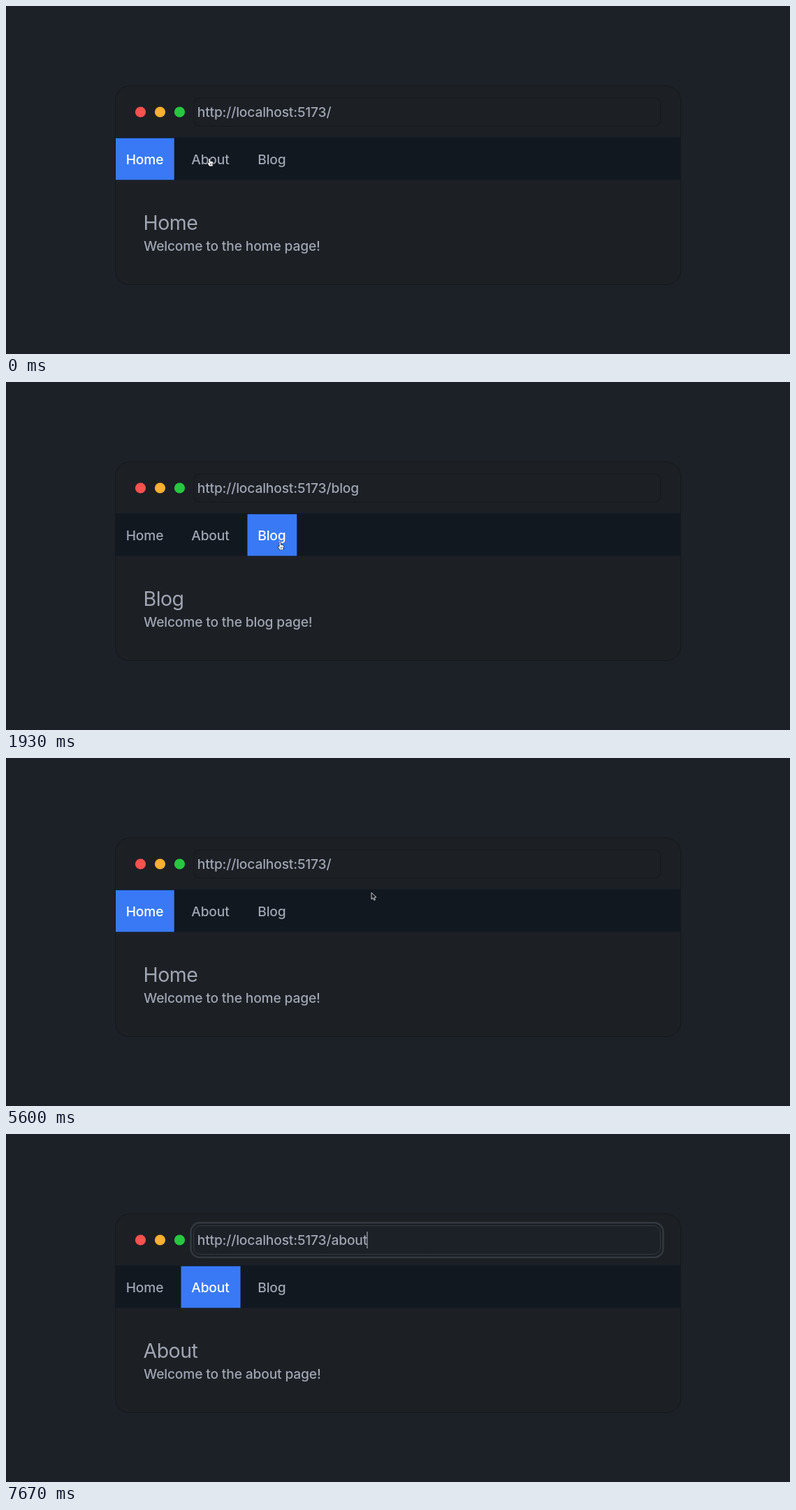
These frames come from a looping animation (1122x499 px, 8000 ms). An HTML page with a canvas:

```html
<!DOCTYPE html>
<html lang="en">
<head>
<meta charset="utf-8">
<title>Router demo</title>
<style>
  html, body { margin: 0; width: 100%; height: 100%; overflow: hidden; background: #1c2027; }
  canvas { display: block; }
</style>
</head>
<body>
<canvas id="stage"></canvas>
<script>
const W = 1122, H = 499, LOOP = 8000, FPS = 15;
const canvas = document.getElementById('stage');
const ctx = canvas.getContext('2d');
const ratio = window.devicePixelRatio || 1;
canvas.width = W * ratio;
canvas.height = H * ratio;
canvas.style.width = W + 'px';
canvas.style.height = H + 'px';

const COLOR = {
  page: '#1c2027', panel: '#1c2025', nav: '#111820', edge: '#15181c',
  ring: '#343840', text: '#a0a5b2', active: '#3979f6', white: '#ffffff', ink: '#14171c'
};
const FONT = {
  body: { weight: 500, size: 19.2, tracking: -0.15 },
  heading: { weight: 400, size: 28.5, tracking: -0.55 }
};
const BASE_URL = 'http://localhost:5173/';
const URL_X = 273.8;
const TABS = [
  { name: 'Home', x: 157, w: 83.7 },
  { name: 'About', x: 250.5, w: 85 },
  { name: 'Blog', x: 345.5, w: 70.7 }
];

// Time from which each state holds
const PAGES = [[0, 'Home'], [130, 'About'], [1530, 'Blog'], [3730, 'Home'], [7670, 'About']];
const TYPED = [[0, ''], [6800, 'a'], [7130, 'ab'], [7400, 'abo'], [7470, 'abou'], [7670, 'about']];
const FOCUS = 5930, CARET_OFF = 6470, TYPING = 6800;

// Pointer strokes: start, end, quadratic curve points
const MOVES = [
  { from: 133, to: 1000, pts: [[291, 219], [340, 252], [393, 228]] },
  { from: 1880, to: 1930, pts: [[393, 228], [393, 229], [392, 230]] },
  { from: 2000, to: 2867, pts: [[392, 230], [305, 288], [207, 221]] },
  { from: 5200, to: 5600, pts: [[207, 221], [370, 475], [523, 193]] },
  { from: 5600, to: 5933, pts: [[523, 193], [514, 166], [500, 153]] }
];

const at = (list, t) => list.filter(([start]) => t >= start).pop()[1];
const smooth = k => k * k * (3 - 2 * k);

function pointerAt(t) {
  const move = MOVES.filter(m => t >= m.from).pop() || MOVES[0];
  const k = smooth(Math.max(0, Math.min(1, (t - move.from) / (move.to - move.from))));
  const [a, b, c] = move.pts;
  return [0, 1].map(i => (1 - k) ** 2 * a[i] + 2 * k * (1 - k) * b[i] + k * k * c[i]);
}

function roundBox(x, y, w, h, r, fill, stroke, line = 1) {
  ctx.beginPath();
  ctx.roundRect(x, y, w, h, r);
  if (fill) { ctx.fillStyle = fill; ctx.fill(); }
  if (stroke) { ctx.strokeStyle = stroke; ctx.lineWidth = line; ctx.stroke(); }
}

function label(str, x, y, color = COLOR.text, font = FONT.body) {
  ctx.font = `${font.weight} ${font.size}px Inter, "Open Sans", sans-serif`;
  ctx.letterSpacing = `${font.tracking}px`;
  ctx.fillStyle = color;
  ctx.fillText(str, x, y);
}

function drawWindow() {
  ctx.fillStyle = COLOR.page;
  ctx.fillRect(0, 0, W, H);
  roundBox(156.5, 115, 809, 284.5, 20, COLOR.panel, COLOR.edge);
  [['#f9524f', 192.5], ['#fbb030', 220.5], ['#27c840', 248.5]].forEach(([color, x]) => {
    ctx.beginPath();
    ctx.arc(x, 152, 7.6, 0, Math.PI * 2);
    ctx.fillStyle = color;
    ctx.fill();
  });
}

function drawAddress(t, page) {
  const focused = t >= FOCUS;
  roundBox(268.5, 131.5, 668, 41, 10, focused ? COLOR.page : null, focused ? COLOR.ring : COLOR.edge);
  if (focused) roundBox(264.5, 127.3, 676, 49.6, 13, null, COLOR.ring, 2.4);

  const path = focused ? at(TYPED, t) : page === 'Home' ? '' : page.toLowerCase();
  const url = BASE_URL + path;
  label(url, URL_X, 159.3);
  if (focused && (t < CARET_OFF || t >= TYPING)) {
    ctx.fillStyle = COLOR.text;
    ctx.fillRect(URL_X + ctx.measureText(url).width - 0.8, 140, 1.2, 24);
  }
}

function drawNav(page) {
  ctx.fillStyle = COLOR.nav;
  ctx.fillRect(157, 188.3, 808.5, 61);
  TABS.forEach(({ name, x, w }) => {
    const active = name === page;
    if (active) {
      ctx.fillStyle = COLOR.active;
      ctx.fillRect(x, 189.5, w, 59.8);
    }
    label(name, x + 14.7, 226.7, active ? COLOR.white : COLOR.text);
  });
}

function shape(x, y, points) {
  ctx.beginPath();
  points.forEach(([px, py]) => ctx.lineTo(x + px, y + py));
  ctx.closePath();
}

function drawArrow(x, y) {
  shape(x, y, [[0, 0], [0, 9.6], [2.2, 7.6], [3.8, 11], [5.4, 10.3], [3.9, 7], [7, 6.8]]);
  ctx.fillStyle = COLOR.ink;
  ctx.fill();
  ctx.strokeStyle = '#dfe1e5';
  ctx.lineWidth = 0.9;
  ctx.stroke();
}

function drawHand(x, y) {
  shape(x, y, [[-0.8, 0], [0.8, 0], [1.1, 3.6], [5, 4.5], [5.6, 6], [4.6, 10.4],
    [0, 10.4], [-2.6, 6.6], [-2.2, 5.6], [-0.4, 6.4]]);
  ctx.lineJoin = 'round';
  ctx.strokeStyle = COLOR.ink;
  ctx.lineWidth = 1.4;
  ctx.stroke();
  ctx.fillStyle = '#f2f3f5';
  ctx.fill();
  ctx.fillStyle = COLOR.ink;
  [1.2, 2.6, 4].forEach(dx => ctx.fillRect(x + dx, y + 6.6, 0.5, 2.3));
}

function drawBeam(x, y) {
  ctx.beginPath();
  [-1, 1].forEach(s => {
    ctx.moveTo(x - 2.6, y + s * 5.2);
    ctx.quadraticCurveTo(x, y + s * 5.2, x, y + s * 3.6);
    ctx.quadraticCurveTo(x, y + s * 5.2, x + 2.6, y + s * 5.2);
  });
  ctx.moveTo(x, y - 4);
  ctx.lineTo(x, y + 4);
  ctx.strokeStyle = '#c4c7cd';
  ctx.lineWidth = 1;
  ctx.stroke();
}

function drawPointer(t) {
  if (t >= TYPING) return;
  const [x, y] = pointerAt(t);
  const overTab = y > 189 && y < 249 && TABS.some(tab => x >= tab.x && x <= tab.x + tab.w);
  const overInput = x > 268 && x < 937 && y > 131 && y < 173;
  (overInput ? drawBeam : overTab ? drawHand : drawArrow)(x, y);
}

function draw(t) {
  // Motion advances on a 15 fps clock
  const step = Math.floor((t + 5) * FPS / 1000) * 1000 / FPS;
  const page = at(PAGES, t);
  ctx.setTransform(ratio, 0, 0, ratio, 0, 0);
  drawWindow();
  drawAddress(t, page);
  drawNav(page);
  label(page, 196.6, 320.5, COLOR.text, FONT.heading);
  label(`Welcome to the ${page.toLowerCase()} page!`, 197, 351.4);
  drawPointer(step);
}

const origin = performance.now();
function tick() {
  draw((performance.now() - origin) % LOOP);
  requestAnimationFrame(tick);
}
tick();
</script>
</body>
</html>
```
